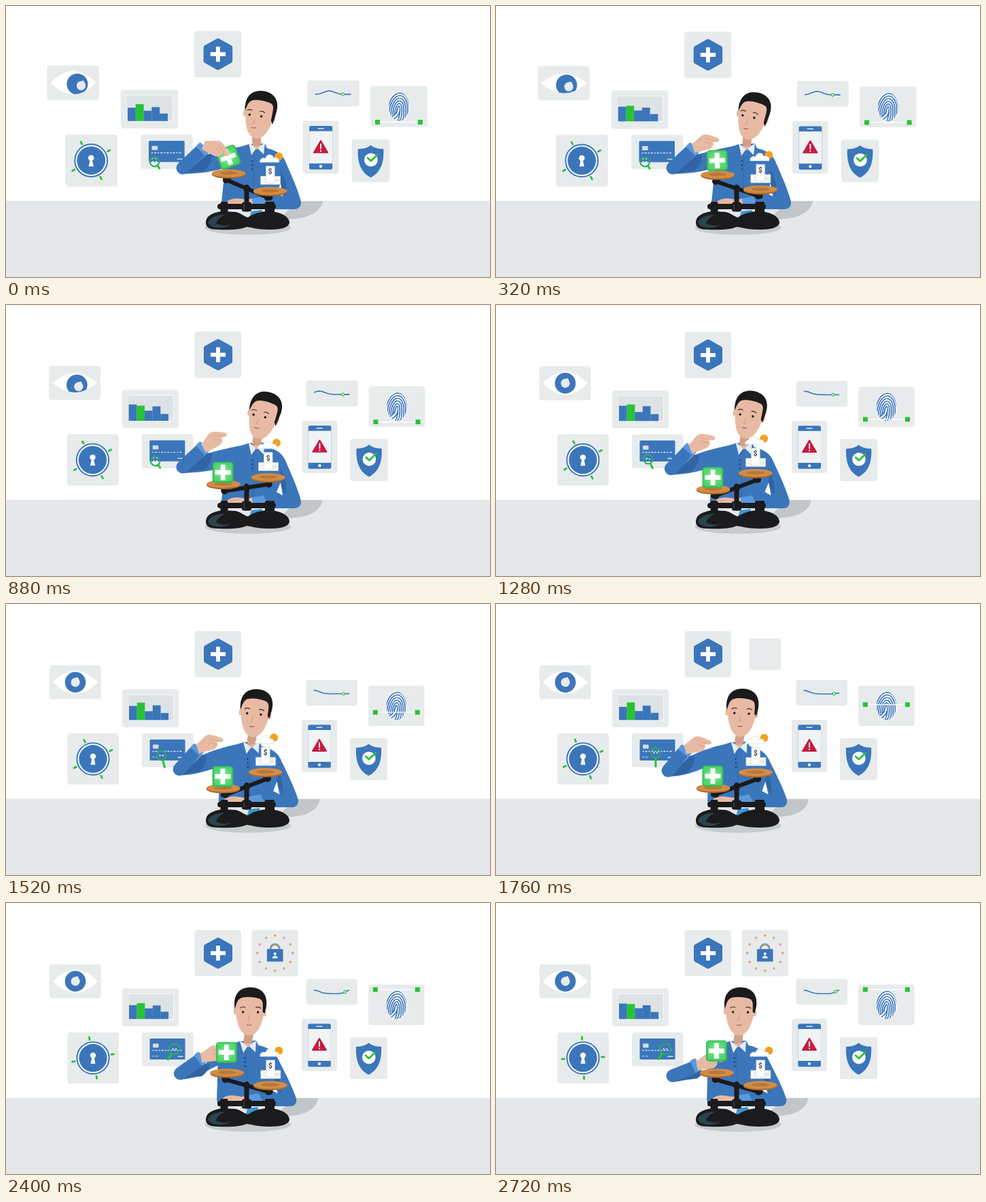
Write an HTML page that moves like this. It is 712 by 400 pixels and loops after 2800 ms.

```html
<!DOCTYPE html>
<html lang="en">
<head>
<meta charset="utf-8">
<title>Weighing safety</title>
<style>
html, body { margin: 0; width: 100%; height: 100%; overflow: hidden; background: #fff; }
svg { display: block; width: 100vw; height: 100vh; }
text { font-family: Roboto, Arial, sans-serif; font-weight: 700; text-anchor: middle; }
</style>
</head>
<body>
<svg id="stage" viewBox="0 0 712 400"></svg>
<script>
const LOOP = 2800;
const BLUE = '#3b76bb', DEEP = '#3164a4', PALE = '#5a98df', GREEN = '#28c234';
const GRAY = '#e7ebec', SKIN = '#e8baa3', SHADE = '#d39f88', INK = '#1b1a1c', TEAL = '#2b444c';

const clamp = (v, a = 0, b = 1) => Math.min(b, Math.max(a, v));
const smooth = v => { v = clamp(v); return v * v * (3 - 2 * v); };
const out = v => 1 - (1 - clamp(v)) ** 3;
const mix = (a, b, p) => a + (b - a) * p;
const rad = Math.PI / 180;

const rect = (x, y, w, h, r, fill, more = '') =>
  `<rect x="${x}" y="${y}" width="${w}" height="${h}" rx="${r}" fill="${fill}" ${more}/>`;
const disc = (x, y, r, fill, more = '') => `<circle cx="${x}" cy="${y}" r="${r}" fill="${fill}" ${more}/>`;
const oval = (x, y, rx, ry, fill) => `<ellipse cx="${x}" cy="${y}" rx="${rx}" ry="${ry}" fill="${fill}"/>`;
const shape = (d, fill, more = '') => `<path d="${d}" fill="${fill}" ${more}/>`;
const stroke = (d, color, w, more = '') =>
  `<path d="${d}" fill="none" stroke="${color}" stroke-width="${w}" stroke-linecap="round" stroke-linejoin="round" ${more}/>`;
const group = (id, body, at = '') => `<g id="${id}" ${at && `transform="translate(${at})"`}>${body}</g>`;
const plus = (x, y, size, w) => rect(x - size / 2, y - w / 2, size, w, 0, '#fff') + rect(x - w / 2, y - size / 2, w, size, 0, '#fff');
const card = (x, y, w, h) => rect(x, y, w, h, 4, GRAY);
const range = (n, f) => Array.from({ length: n }, (_, i) => f(i));
const repeat = (n, f) => range(n, f).join('');

const eyeCard = card(64, 90.5, 75.5, 50) + group('eye',
  '<clipPath id="lidClip"><path id="lidHole"/></clipPath><path id="lid" fill="#fff"/>' +
  '<g clip-path="url(#lidClip)">' + group('iris', disc(0, 0, 15.3, BLUE) +
  shape('M0 -6.5L4 -7.5L6 -3.5A6.6 6.6 0 1 1 0 -6.5Z', '#e6ebee', 'id="pupil"')) + '</g>', '102 115.5');

const plusCard = card(277.5, 40, 68.5, 68) +
  shape('M312 54.5L329.5 64.3V83.7L312 93.5L294.5 83.7V64.3Z', BLUE, `stroke="${BLUE}" stroke-width="7" stroke-linejoin="round"`) +
  plus(312, 74, 22, 5.8);

const chartCard = card(171, 126, 83, 56) + rect(180.5, 134, 66, 37.5, 0, '#dde2e4') +
  stroke('M180.5 134H246.5V171.5H180.5', '#f7f9f9', 1) +
  repeat(5, i => rect(181 + i * 11.6, 150, 11.7, 20, 0, i === 1 ? GREEN : BLUE, 'class="bar"'));

const keyCard = card(90.5, 191, 75.5, 75.5) + group('dial',
  disc(0, 0, 23.6, '#f4f7f8', `stroke="${BLUE}" stroke-width="1.9"`) + disc(0, 0, 20.6, BLUE) +
  shape('M-1.8 0L-3.5 8.5H3.5L1.8 0Z', '#fff') + disc(0, -3.7, 4.2, '#fff') +
  group('ticks', repeat(4, i => stroke('M0 -27.4V-31', GREEN, 2.8, `transform="rotate(${i * 90})"`))), '128 228.7');

const bankCard = card(200, 191, 75.5, 50) + rect(211.5, 200, 52, 31, 1.5, BLUE) +
  rect(216, 207.5, 8.5, 6, 1, '#d5dde3') +
  stroke('M216 217.5H259', '#dce8f5', 1.4, 'stroke-dasharray="1 3 2 3"') +
  stroke('M216 226H224', '#dce8f5', 1.2, 'stroke-dasharray="2 3"') + stroke('M253 226.5H260', '#dce8f5', 1.3) +
  group('lens', '<circle id="rim" fill="none" stroke="#2faa5c" stroke-width="2"/>' + stroke('', GREEN, 3, 'id="handle"')) +
  group('digits', disc(-2.2, 0, 1.1, '#fff') + disc(2.2, 0, 1.1, '#fff'));

const lineCard = card(441.5, 112, 75.5, 38) + group('graph', stroke('', BLUE, 1.6, 'id="curve"') +
  disc(0, 0, 2, '#f4faf4', `id="dot" stroke="${GREEN}" stroke-width="1.2"`), '479.3 131');

const printCard = card(533, 120.5, 82.5, 59.5) + group('print',
  '<clipPath id="tip"><ellipse rx="14.8" ry="21"/></clipPath>' + oval(0, 0, 16, 22, '#f4f6f7') +
  '<g clip-path="url(#tip)">' + repeat(6, i => {
    const r = 1.5 + i * 2.8;
    return stroke(`M${-r - 2} ${9 + r * .4}C${-r} ${-r * 1.9} ${r} ${-r * 1.9} ${r} 4S${r - 1} 18 ${r - 6} 24`,
      BLUE, 1.6, `stroke-dasharray="${14 + i * 5} 1.6"`);
  }) + stroke('M-14 16Q-4 14 -2 3M-12 20Q-2 17 1 8', BLUE, 1.6) + '</g>' +
  group('scan', stroke('M-31 0H31', '#fff', 1.3) + rect(-34.5, -3.4, 7, 6.8, 0, GREEN) + rect(27.5, -3.4, 7, 6.8, 0, GREEN)),
  '574.3 150.3');

const phoneCard = card(435, 171, 52, 77) + rect(444.3, 178.3, 33.6, 63.5, 2.5, BLUE) +
  rect(444.3, 186, 33.6, 47, 0, '#f0f3f4') + stroke('M457 182.2H465', '#fff', 1.2) + disc(461, 237.3, 2.1, '#fff') +
  shape('M461 200L471 217H451Z', '#c51c42', 'stroke="#c51c42" stroke-width="2" stroke-linejoin="round"') +
  stroke('M461 205V211.5', '#fff', 1.9) + disc(461, 214.8, 1.1, '#fff');

const shieldCard = card(506, 198, 55, 62) +
  shape('M533.5 206.5C528 211 521 212 515 212C514 232 519 246 533.5 253.5C548 246 553 232 552 212C546 212 539 211 533.5 206.5Z', BLUE) +
  disc(533.8, 227.8, 9.8, '#fff') + stroke('M529 225L533.8 229.3L543.5 220', GREEN, 2.8);

const starPath = 'M' + range(10, i => {
  const r = i % 2 ? 1.1 : 2.7, a = i * Math.PI / 5;
  return `${r * Math.sin(a)} ${-r * Math.cos(a)}`;
}).join('L') + 'Z';
const lockCard = group('lockCard', rect(-34.2, -34.2, 68.4, 68.4, 4, GRAY)) + group('lock',
  stroke('M-6.5 -3V-6.5A6.5 6.5 0 0 1 6.5 -6.5V-3', '#8e9598', 3, 'id="shackle"') +
  group('lockBody', rect(-11.8, -6, 23.6, 18.5, .8, BLUE) + disc(0, 1, 2, '#fff') + shape('M-4 7.5C-4 2.8 4 2.8 4 7.5Z', '#fff')) +
  repeat(12, () => shape(starPath, '#f0965a', 'class="star"')), '395.7 74');

const torso = shape('M430 288H466C464 300 452 312 424 314L400 316Z', '#c2c6c8') +
  shape('M357 204C345 209 335 208 326 214L322 240L317 290L318 300H424C432 300 436 294 433 285C428 268 420 250 413 234C408 219 398 213 384 210L381 203Z', BLUE) +
  shape('M404 240L412 262V282L404 264Z', DEEP) + shape('M404 262L398 276L407 281Z', '#fff') +
  stroke('M365 215L363 283', DEEP, .8) +
  repeat(3, i => disc(362, 229 + i * 6, 1.2, '#1f4272')) +
  shape('M326 288C334 282 345 284 354 286L363 284V294H327C324 293 324 290 326 288Z', SKIN) +
  stroke('M329 289L340 288', SHADE, .8) +
  shape('M362 284L379 281L384 292L363 295Z', PALE) + shape('M361 303L376 301L380 309L366 315L358 312Z', '#3f94cf');
const collar = shape('M357 202L361 220L369 209L381 202L379 219L370 210Z', '#e4edf7') + shape('M364 207L369 212L375 206Z', SKIN);

const head = shape('M-20 -57C-22 -28 -15 0 0 0C14 0 21 -20 23 -42V-57Z', SKIN) +
  oval(-20.5, -35, 2.4, 4.5, SKIN) + oval(22.8, -33, 2.4, 4.5, SKIN) + shape('', INK, 'id="hair"') +
  disc(0, 0, 1.7, INK, 'id="eyeL"') + disc(0, 0, 1.7, INK, 'id="eyeR"') +
  stroke('', '#3a2a26', 1.2, 'id="brows"') + stroke('', SHADE, 1.2, 'id="nose"') + stroke('', '#a85f55', 1.2, 'id="mouth"');

const hand = shape('M-7 -7C2 -9 7 -15 14 -15C20 -14 27 -8 31 -5C35 -2 33 2 29 1L23 -1C25 4 19 9 12 8L-7 7Z', SKIN) +
  stroke('M14 -9L25 -2M12 -4L21 2', SHADE, .9);

const pan = (id, load = '') => group(id, stroke('M0 4V10', INK, 7) + oval(0, 1.3, 24.8, 6.2, '#a9682f') +
  oval(0, -.4, 24.8, 5.8, '#d18c46') + oval(0, -.6, 13, 2.6, '#b87839') + load);
const edge = 'stroke="#d0d6d9" stroke-width=".7"';
const goods = disc(12.5, -51, 6, '#f4a01f') +
  shape('M-15 -42.5C-16 -49 -8 -50 -7 -48C-6 -56 4 -55 5 -49C10 -51 14 -47 13 -42.5Z', '#fff', edge) +
  rect(-14, -22, 29, 12, 0, '#fff', edge) +
  stroke('M-10 -18H-7M-10 -14H-7M8 -18H12M8 -14H12M2 -10V-22M-5 -16H15', '#c3cacf', .8) +
  rect(-6, -37, 12.5, 25, 0, '#fff', edge) + '<text x="0" y="-25" font-size="10" fill="#454b52">$</text>';

const scaleBase = oval(356, 327, 63.5, 10.8, '#c7cbcc') + stroke('M354 267V300', INK, 7, 'stroke-linecap="butt"') +
  stroke('M315 296H393', INK, 8) + rect(315.5, 289, 11, 17, 2, INK) + rect(347, 289.5, 14, 14, 3, INK) +
  rect(381, 289, 14, 17, 2, INK) + stroke('M350 293V300', '#3d4b50', 1.4) +
  shape('M294 320C294 309 305 305 318 303L338 304C347 306 350 311 356 312C361 309 368 304 385 303C402 303 417 310 417 320C415 329 400 330 385 330C370 330 363 327 354 326C345 330 330 331 312 330C300 330 294 327 294 320Z', INK) +
  shape('M297 319C301 311 312 308 322 308C315 312 310 316 309 321C317 325 325 325 331 322C325 329 300 330 297 319Z', TEAL);

const box = rect(-15.4, -15.4, 30.8, 30.8, 4.5, '#36bd55') + rect(-13.6, -14, 27.2, 27, 4, 'url(#glow)') + plus(0, 0, 23, 6.8);

const stage = document.getElementById('stage');
stage.innerHTML = '<defs><radialGradient id="glow"><stop offset="0" stop-color="#86eb97"/><stop offset="1" stop-color="#52d46d"/></radialGradient></defs>' +
  rect(0, 0, 712, 400, 0, '#fff') + rect(0, 287.5, 712, 112.5, 0, '#e4e8ea') +
  group('cards', eyeCard + plusCard + chartCard + keyCard + bankCard + lineCard + printCard + phoneCard + shieldCard + lockCard) +
  group('torso', torso) + stroke('', SHADE, 13, 'id="neck"') + group('collar', collar) + group('head', head) +
  shape('', BLUE, 'id="upper"') + shape('', DEEP, 'id="fold"') + stroke('', BLUE, 19, 'id="fore"') +
  group('cuff', rect(-4, -10, 9, 20, 2, PALE)) +
  scaleBase + group('beam', stroke('M-33 0H33', INK, 6) + repeat(3, i => disc(i * 33 - 33, 0, 5, INK))) +
  pan('panL') + pan('panR', goods) + group('box', box) + group('hand', hand);

const $ = id => document.getElementById(id);
const set = (el, name, v) => (typeof el === 'string' ? $(el) : el).setAttribute(name, v);
const place = (el, x, y, turn = 0, sx = 1, sy = sx) =>
  set(el, 'transform', `translate(${x} ${y}) rotate(${turn}) scale(${sx} ${sy})`);
const bars = [...document.querySelectorAll('.bar')], stars = [...document.querySelectorAll('.star')];
const barBase = [21.5, 24, 14.5, 21, 10.5];

// Shared phases of the story, each running from 0 to 1.
const phases = t => ({
  release: smooth(t / 480),
  lean: smooth((t - 800) / 1250),
  lift: smooth((t - 2080) / 600),
  lookUp: smooth((t - 950) / 250),
  open: .2 + .8 * smooth((Math.abs(t - 2090) - 15) / 120)
});

function drawEye({ release, lookUp, open }) {
  const gaze = 1 - lookUp, h = 34 * open * (1 - .18 * release * gaze);
  const lid = `M-33 0Q0 ${-h} 33 0Q0 ${h} -33 0`;
  set('lid', 'd', lid);
  set('lidHole', 'd', lid);
  place('iris', mix(6, 3, release) * gaze, mix(2, 3, release) * gaze);
  place('pupil', mix(5, 2, release) * gaze - .4 * lookUp, 2.3 * gaze);
}

function drawGraph(t) {
  const left = -6 - 20 * smooth(t / 1500), end = smooth((t - 1400) / 1200);
  const bump = (x, at, w) => Math.exp(-(((x - at) / w) ** 2));
  const y = x => 1.5 + 1.3 * end - 5 * bump(x, left, 11) - 6 * end * bump(x, 28, 9);
  set('curve', 'd', 'M' + range(35, i => i * 1.5 - 26).map(x => `${x} ${y(x).toFixed(2)}`).join('L'));
  const x = 13.5 + 7 * t / LOOP;
  place('dot', x, y(x));
}

function drawLens(t) {
  const s = smooth((t - 900) / 1700), r = 6.8 + 1.2 * s ** 4;
  const x = mix(220, 249, s), y = 230.5 - 15 * Math.sin(s * Math.PI / 2);
  place('lens', x, y, 54 + 70 * s);
  place('digits', x, y);
  set('rim', 'r', r);
  set('handle', 'd', `M${r + 1} 0H${12 + 6 * s + 5 * Math.sin(Math.PI * s)}`);
}

function drawLock(t) {
  place('lockCard', 395.7, 74, 0, out((t - 1640) / 380));
  place('lockBody', 0, 0, 0, out((t - 1900) / 240));
  const up = out((t - 2090) / 200);
  place('shackle', 0, (1 - up) * 10);
  set('shackle', 'opacity', up > 0 ? 1 : 0);
  // Stars drift onto the ring, starting from its lower right.
  stars.forEach((star, i) => {
    const p = clamp((t - 1960 - 40 * Math.abs(i - 5)) / 240), q = 1 - smooth(p), a = i * 30 * rad;
    place(star, 26 * Math.sin(a) + 18 * Math.sin(i * i * 2) * q, -26 * Math.cos(a) + 14 * Math.cos(i * 3) * q,
      -90 * q, out(p * 1.6));
  });
}

function drawCards(t, phase) {
  const zoom = 1 + .0145 * clamp(1 - t / 1500) ** 1.8;
  set('cards', 'transform', `translate(320 275) scale(${zoom}) translate(-320 -275)`);
  bars.forEach((bar, i) => {
    const h = barBase[i] + (2.6 - .55 * i) * Math.sin(2 * Math.PI * (t - 330) / 2200 - 2.5 * i);
    set(bar, 'y', 171.3 - h);
    set(bar, 'height', h);
  });
  place('ticks', 0, 0, -29 + 26 * clamp((t - 800) / 1900) ** 2);
  place('scan', 0, 22.6 * Math.cos(Math.PI * clamp((t - 1000) / 1450)));
  drawEye(phase);
  drawGraph(t);
  drawLens(t);
  drawLock(t);
}

function drawBody({ release, lean, open }) {
  const hip = -6.5 * lean, top = -13 * lean, k = (top - hip) / 90, drop = 1.3 * release;
  const skew = `matrix(1 0 ${-k} 1 ${hip + k * 295} 0)`;
  set('torso', 'transform', skew);
  set('collar', 'transform', `translate(0 ${drop}) ${skew}`);

  const cx = 367 + 3 * release - 13 * lean, cy = 195.5 + 2 * release * (1 - lean), s = 1 - lean;
  set('neck', 'd', `M${cx + 1} ${cy - 8}L${369 + top} ${202 + drop}`);
  place('head', cx, cy, 8 + 5 * release - 12 * lean);
  set('hair', 'd', `M-21 -38C-25 -62 -13 -71 2 -71C18 -71 28 -60 25 -42L${23 - s} ${-33 + 9 * s}L${20 - s} ${-35 + 6 * s}` +
    'C20 -46 21 -51 16 -54C8 -57 -8 -58 -14 -54C-18 -51 -19 -46 -21 -38Z');
  const left = -9 - 4.5 * s, right = 13 - 9 * s, y = -34.5 + s, mid = -5 * s;
  place('eyeL', left, y, 0, 1, open);
  place('eyeR', right, y, 0, 1, open);
  set('brows', 'd', `M${left - 4} ${y - 6}q3 -2.6 7 -1M${right - 3} ${y - 7}q4 -1.6 7 1`);
  set('nose', 'd', `M${mid + 1} ${y + 4}l-3 8h3`);
  set('mouth', 'd', `M${mid - 3} -15.5q3 1.3 6.5 -.5`);
}

function drawArm({ release, lean, lift }) {
  const ex = 260 - 8 * lean + 8 * lift, ey = 239 + 8 * lean + 8 * lift;
  const wx = 289 - 13 * lean + 17 * lift, wy = 211.5 + 6.5 * lean + 22 * lift;
  const turn = Math.atan2(wy - ey, wx - ex), d = -9 * lean;
  set('upper', 'd', `M${343 + d} 208C${328 + d} 211 ${315 + d} 214 ${wx + 9} ${wy + 7}L${ex} ${ey + 9}` +
    `C${ex + 30} ${ey + 8} ${306 + d} 244 ${326 + d} 238Z`);
  set('fold', 'd', `M${ex + 5} ${ey + 8}L${wx + 7} ${wy + 7}L${wx + 14} ${wy + 8}Q${wx + 14} ${ey - 5} ${wx + 3} ${ey + 4}Z`);
  set('fore', 'd', `M${ex} ${ey}L${wx - 3} ${wy + 3}`);
  place('cuff', wx, wy, turn / rad);
  place('hand', wx + 2 + 8 * Math.cos(turn), wy + 2 + 8 * Math.sin(turn), mix(24, -30, release) + 20 * lean);
}

function drawScale(t) {
  const tilt = 23 - 44 * smooth((t - 100) / 1200) + 37 * smooth((t - 1700) / 650);
  const c = Math.cos(tilt * rad), s = Math.sin(tilt * rad), x = 354.2, y = 269.5;
  const panX = x - 33.2 * c + 10 * s, panY = y - 33.2 * s - 10 * c;
  place('beam', x, y, tilt);
  place('panL', panX, panY);
  place('panR', x + 33.2 * c + 10 * s, y + 33.2 * s - 10 * c);
  const raise = 6.5 * (1 - smooth(t / 700)) + 15 * smooth((t - 1800) / 800);
  place('box', panX - .7, panY - 17.5 - raise, -20 * (1 - smooth(t / 400)));
  stage.append($(t < 2200 ? 'hand' : 'box'));
}

function draw(t) {
  const phase = phases(t);
  drawCards(t, phase);
  drawBody(phase);
  drawArm(phase);
  drawScale(t);
}

const begin = performance.now();
function tick() {
  draw((performance.now() - begin) % LOOP);
  requestAnimationFrame(tick);
}
tick();
</script>
</body>
</html>
```
